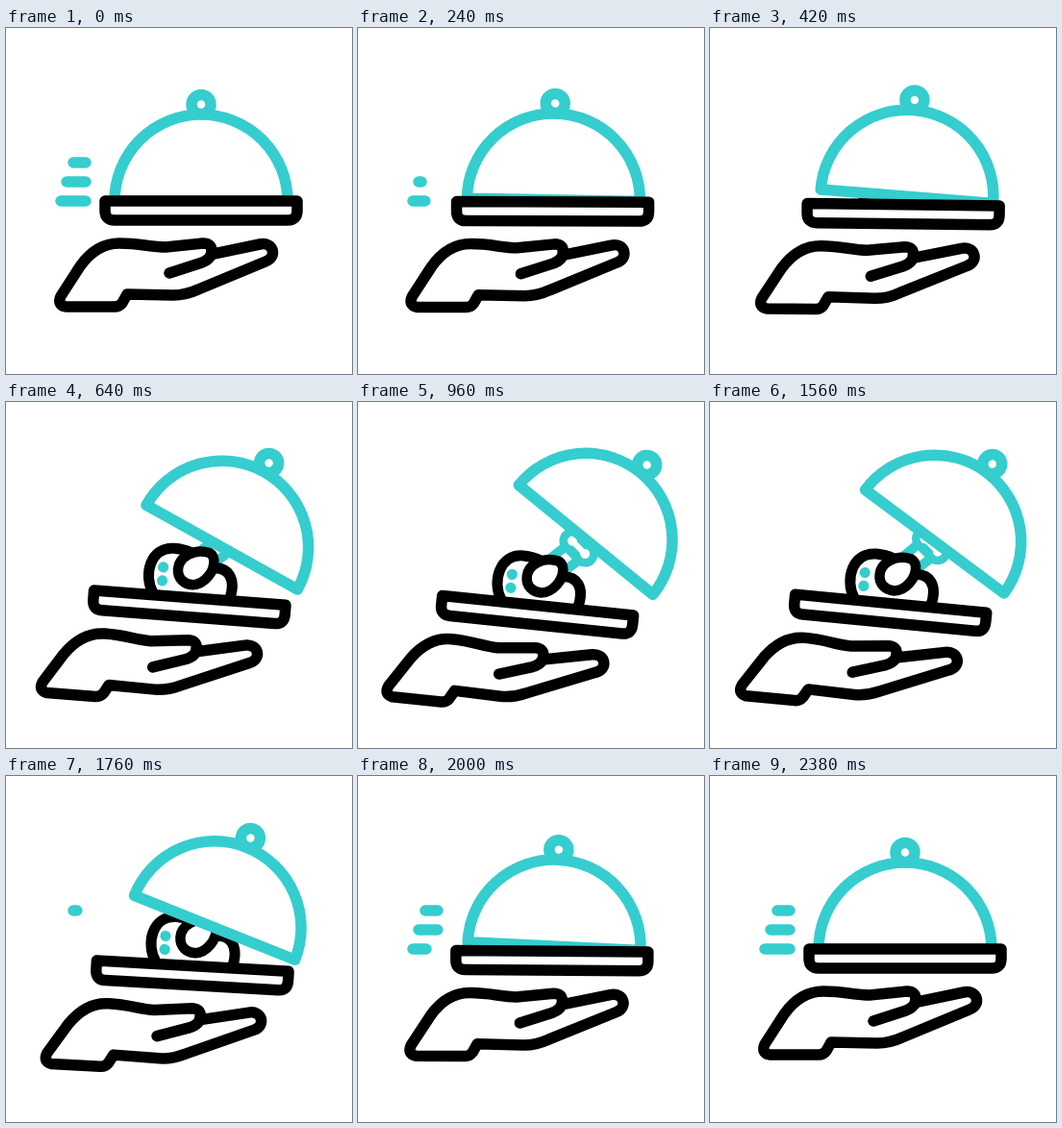
Recreate the animation shown at these times as an HTML page. Size 360 by 360 pixels, loop 2.4 s.

```html
<!DOCTYPE html>
<html>
<head>
<meta charset="utf-8">
<style>
  html, body { margin: 0; width: 100%; height: 100%; overflow: hidden; background: #fff; }
  svg { display: block; width: 100%; height: 100%; }
  path, circle { fill: #fff; stroke: #000; stroke-width: 11.5; stroke-linecap: round; stroke-linejoin: round; }
  .teal { stroke: #35cdce; }
  .dot { fill: #35cdce; stroke: none; }
  .hole { stroke: none; }
  .line { fill: none; }
</style>
</head>
<body>
<svg viewBox="0 0 360 360">
  <g class="tray">
    <path class="teal line" d="M212 129L222 119M227 141L238 131" style="stroke-width:10"/>
    <path class="teal line" d="M231.7 109.5L246.3 121.5" style="stroke-width:27"/>
    <path class="line" d="M231.7 109.5L246.3 121.5" style="stroke:#fff;stroke-width:6"/>
    <circle class="hole" cx="231.7" cy="109.5" r="5"/>
    <circle class="hole" cx="246.3" cy="121.5" r="5"/>
    <path d="M164.5 178C152.5 160 158 130 183 130Q193 130 201 133L223 148C240 144 250 156 244.5 178" style="stroke-width:11"/>
    <path d="M220 132C203 128 188.5 139 188.5 151C188.5 161 196 166.5 205 166.5C217 165 227 151 225 139Q224 134 220 132Z" style="stroke-width:10.5"/>
    <circle class="dot" cx="173" cy="150.5" r="5.6"/>
    <circle class="dot" cx="173" cy="164.5" r="5.6"/>
  </g>
  <g id="lid">
    <path class="teal" d="M113 180A90 90 0 0 1 293 180Z"/>
    <circle class="teal" cx="203" cy="79.5" r="10"/>
  </g>
  <g class="tray">
    <path d="M103 180H303V190Q303 200 293 200H113Q103 200 103 190Z"/>
    <path d="M57 279L77 248Q94 224 118 224C140 224 150 228 166 228L205 224Q214 224 214 232L216 235L264 225C278 222 283 238 270 243L200 272Q187 278 174 278L126 277L121 286Q118 290 113 290H62Q53 288 57 279Z"/>
    <path class="line" d="M214 232Q214 240 204 244L170 255"/>
  </g>
  <path class="teal streak"/>
  <path class="teal streak"/>
  <path class="teal streak"/>
</svg>
<script>
const LOOP = 2400, MOVE = 1170, BACK = 1184;
const trays = document.querySelectorAll('.tray');
const lid = document.getElementById('lid');
const streaks = document.querySelectorAll('.streak');
const starts = [70, 63, 57];
const clamp = v => Math.min(1, Math.max(0, v));
const smooth = u => u * u * (3 - 2 * u);

// cubic-bezier(.85, 0, .15, 1), solved by bisection
function ease(u) {
  let lo = 0, hi = 1;
  for (let i = 0; i < 24; i++) {
    const s = (lo + hi) / 2, r = 1 - s;
    if (2.55 * s * r * r + 0.45 * s * s * r + s * s * s < u) lo = s; else hi = s;
  }
  return smooth(lo);
}

function draw(t) {
  const p = ease(clamp(t < BACK ? t / MOVE : 1 - (t - BACK) / MOVE));
  trays.forEach(g => g.setAttribute('transform',
    `translate(${-16 * p} ${30 * p}) rotate(${6 * p} 180 180)`));
  lid.setAttribute('transform',
    `translate(${14 * p} ${20.7 * p}) rotate(${40 * p} 293 180)`);
  streaks.forEach((el, i) => {
    const grown = t < BACK
      ? 1 - smooth(clamp((t - 60 * i) / 240))
      : smooth(clamp((t - 1675 - 100 * i) / 240));
    const x = starts[i];
    el.style.display = grown > 0 ? '' : 'none';
    el.setAttribute('d', `M${x} ${140 + 20 * i}H${x + (83 - x) * grown}`);
  });
}

function tick() {
  draw(performance.now() % LOOP);
  requestAnimationFrame(tick);
}
tick();
</script>
</body>
</html>
```
